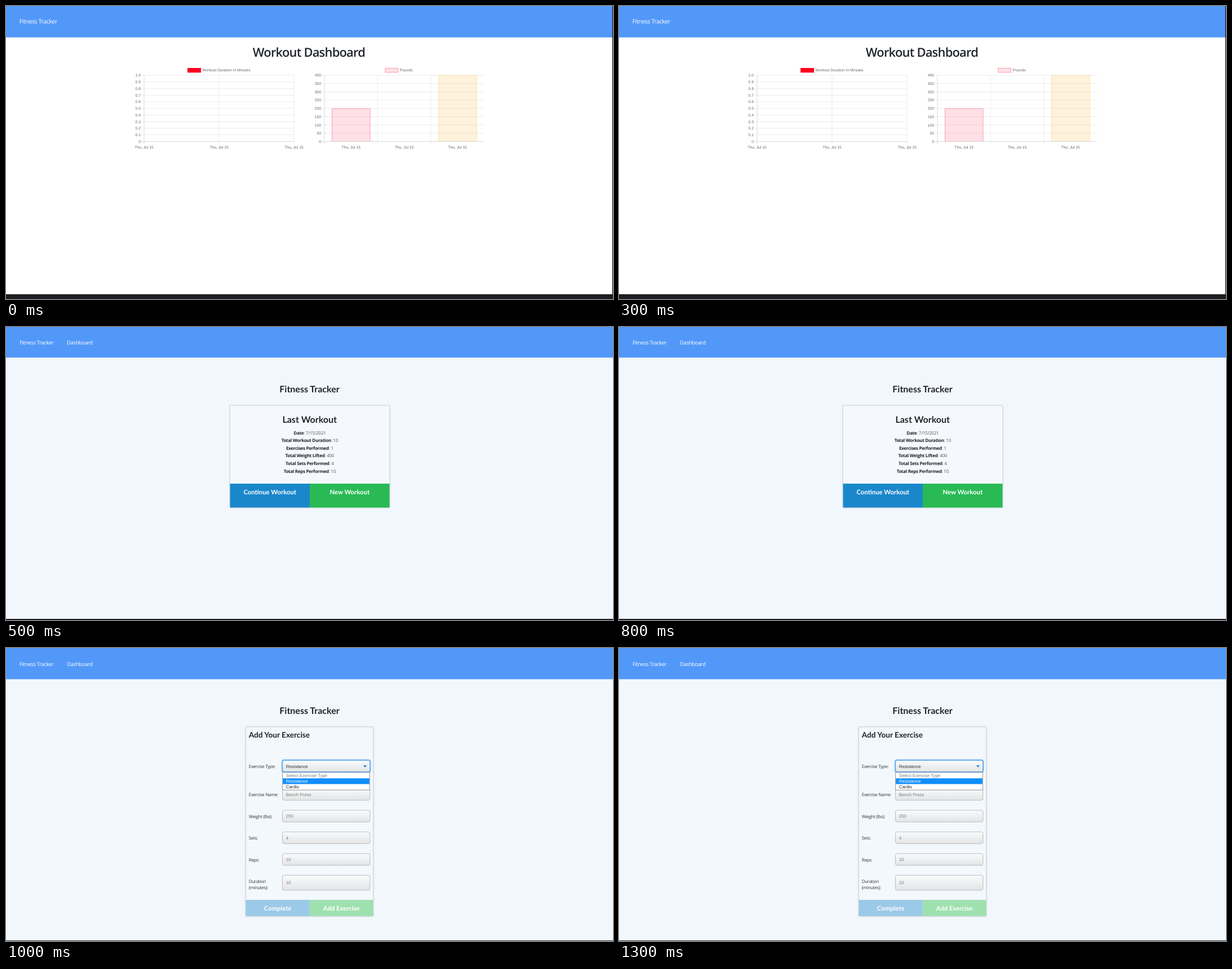
Recreate the animation shown at these times as an HTML page. Size 1077x520 px, loop 1.5 s.

```html
<!DOCTYPE html>
<html lang="en">
<head>
<meta charset="utf-8">
<title>Fitness Tracker</title>
<style>
  html, body { margin: 0; width: 100%; height: 100%; overflow: hidden; background: #fff; }
  svg { display: block; width: 1077px; height: 520px; text-rendering: geometricPrecision; }
  .page { animation: show 1.5s step-end infinite; }
  #home { animation-delay: -1s; }
  #exercise { animation-delay: -.5s; }
  @keyframes show {
    0% { visibility: visible; }
    33.3333%, 100% { visibility: hidden; }
  }
  .ui { font-family: "Open Sans", "Noto Sans", sans-serif; letter-spacing: -.035em; }
  .lato { font-family: Lato, sans-serif; font-weight: 700; }
  .arial { font-family: "Liberation Sans", Arial, sans-serif; }
  .mid { text-anchor: middle; }
  .end { text-anchor: end; }
  .card { filter: drop-shadow(0 .6px 1.2px rgba(60, 70, 80, .35)); }
</style>
</head>
<body>
<svg viewBox="0 0 1077 520">
  <defs>
    <linearGradient id="field" x2="0" y2="1">
      <stop stop-color="#fafbfc"/>
      <stop offset="1" stop-color="#e3e4e5"/>
    </linearGradient>
  </defs>
  <g id="dashboard" class="page"></g>
  <g id="home" class="page"></g>
  <g id="exercise" class="page"></g>
</svg>
<script>
const NAV = '#5298f9', INK = '#212529', BLUE = '#1b87cb', GREEN = '#29ba55';

const rect = (x, y, w, h, fill, extra = '') =>
  `<rect x="${x}" y="${y}" width="${w}" height="${h}" fill="${fill}" ${extra}/>`;
const text = (x, y, size, cls, fill, body, extra = '') =>
  `<text x="${x}" y="${y}" font-size="${size}" class="${cls}" fill="${fill}" ${extra}>${body}</text>`;
const path = (d, stroke, width = 1) =>
  `<path d="${d}" fill="none" stroke="${stroke}" stroke-width="${width}"/>`;
const show = (id, ...parts) => document.getElementById(id).innerHTML = parts.flat().join('');

const label = (x, y, body, cls = '') => text(x, y, 6.75, 'arial ' + cls, '#666', body);
const title = y => text(538.5, y, 16, 'lato mid', INK, 'Fitness Tracker');
const nav = (height, baseline) => [
  rect(0, 0, 1077, height, NAV),
  text(24, baseline, 9.45, 'ui', '#fff', 'Fitness Tracker'),
  text(108, baseline, 9.45, 'ui', '#fff', 'Dashboard')
];
const button = (x, y, w, h, fill, baseline, body) =>
  rect(x, y, w, h, fill) + text(x + w / 2, baseline, 11.3, 'lato mid', '#fff', body);

// Grid lines and value labels, from the top value down to zero
function grid(left, right, values, columns) {
  const top = 123, bottom = 240.5, step = (bottom - top) / (values.length - 1);
  const rows = values.map((value, i) => {
    const y = top + i * step, zero = i === values.length - 1;
    return path(`M${left - 5} ${y}H${right}`, zero ? '#cfcfcf' : '#e6e6e6', .8) +
      label(left - 6, y + 2.4, value, 'end');
  });
  const lines = columns.map((x, i) => path(`M${x} ${top}V245`, i ? '#e6e6e6' : '#d2d2d2', .8));
  return [...rows, ...lines];
}
const dates = centers => centers.map(x => label(x, 252.6, 'Thu, Jul 15', 'mid'));
const bar = (x, y, w, fill, stroke) =>
  rect(x, y, w, 240.5 - y, fill) + path(`M${x} 240.5V${y}H${x + w}V240.5`, stroke);

const tenths = Array.from({ length: 11 }, (_, i) => i === 10 ? '0' : (1 - i / 10).toFixed(1));
const pounds = Array.from({ length: 9 }, (_, i) => 400 - i * 50);

show('dashboard',
  rect(0, 0, 1077, 520, '#fff'),
  rect(0, 0, 1077, 55.7, NAV),
  text(23.7, 30.8, 10.5, 'ui', '#fff', 'Fitness Tracker'),
  text(537.5, 89.6, 21.9, 'ui mid', INK, 'Workout Dashboard', 'font-weight="600"'),
  grid(245, 511, tenths, [245, 378, 511]),
  dates([245, 378, 511]),
  rect(322, 110, 24, 8.2, '#ff0020'),
  label(348.3, 116.3, 'Workout Duration In Minutes'),
  grid(565, 848, pounds, [565, 659.3, 753.8]),
  dates([612.3, 706.6, 801]),
  bar(578.5, 182, 67.5, 'rgba(255,99,132,.2)', '#fb9cb0'),
  bar(767.5, 123.3, 67.8, 'rgba(255,180,60,.18)', '#fce3ae'),
  rect(672.8, 110.4, 22.6, 7.4, '#ffe0e6', 'stroke="#fb9cb0"'),
  label(698.8, 116.3, 'Pounds'),
  rect(0, 511.5, 1077, 8.5, '#1c1d22'),
  rect(1075.7, 0, 1.3, 520, '#26272c')
);

const summary = [
  ['Date', '7/15/2021'],
  ['Total Workout Duration', 10],
  ['Exercises Performed', 1],
  ['Total Weight Lifted', 400],
  ['Total Sets Performed', 4],
  ['Total Reps Performed', 10]
];

show('home',
  rect(0, 0, 1077, 520, '#f2f7fe'),
  nav(54.3, 30.6),
  title(116),
  rect(397.5, 139.5, 283, 181, '#f5f9fd', 'rx="1.5" class="card" stroke="#d6dadf" stroke-width=".7"'),
  text(538.7, 169.8, 16, 'lato mid', INK, 'Last Workout'),
  summary.map(([name, value], i) => text(538.8, 190.6 + i * 13.6, 8, 'ui mid', '#555',
    `<tspan font-weight="700" fill="${INK}">${name}</tspan>: ${value}`)),
  button(397.5, 278, 141.5, 42.4, BLUE, 297, 'Continue Workout'),
  button(539, 278, 141.5, 42.4, GREEN, 297, 'New Workout'),
  rect(0, 518, 1077, 2, '#1c1d22')
);

const caption = (y, body) => text(430.8, y, 7.9, 'ui', '#333', body);
const value = (y, body, fill = '#7b7b7b') => text(496.7, y, 7.9, 'arial', fill, body);
const field = (y, h, body) =>
  rect(490.5, y, 155.3, h, 'url(#field)', 'rx="3" stroke="#b4b7ba" stroke-width=".9"') +
  value(y + h / 2 + 2.7, body);

show('exercise',
  rect(0, 0, 1077, 520, '#f2f7fc'),
  nav(55.4, 31.6),
  title(117),
  rect(425.5, 140.2, 226, 335.6, '#f3f8fd', 'rx="1.5" class="card" stroke="#d0d5da" stroke-width=".7"'),
  text(430.8, 159.4, 13.6, 'lato', INK, 'Add Your Exercise'),
  caption(213.4, 'Exercise Type:'),
  caption(263.2, 'Exercise Name:'),
  caption(301.7, 'Weight (lbs):'),
  caption(340.1, 'Sets:'),
  caption(378.5, 'Reps:'),
  caption(417, 'Duration'),
  caption(428, '(minutes):'),
  field(249.4, 20.8, 'Bench Press'),
  field(288, 20.8, '200'),
  field(326.4, 20.8, '4'),
  field(364.9, 20.8, '10'),
  field(403.3, 26.6, '10'),
  rect(490.3, 199.2, 155.8, 20.8, 'url(#field)',
    'rx="3" stroke="#5eaaf0" stroke-width="1.8" style="filter:drop-shadow(0 0 1px #8cc4f5)"'),
  value(212.8, 'Resistance', '#333'),
  `<path d="M633.8 208.2h6.4l-3.2 3.8z" fill="${BLUE}"/>`,
  rect(490.7, 220.8, 154.6, 31.2, '#fff', 'stroke="#85888b" stroke-width=".9"'),
  value(228.8, 'Select Exercise Type'),
  rect(491.2, 231.3, 153.6, 10.2, '#0f8efc'),
  value(238.9, 'Resistance', '#fff'),
  value(249, 'Cardio', '#222'),
  button(425.5, 447, 113.3, 28.8, '#9bc9e8', 465.8, 'Complete'),
  button(538.8, 447, 112.7, 28.8, '#9ee1af', 465.8, 'Add Exercise'),
  rect(0, 518.8, 1077, 1.2, '#4a4c52')
);
</script>
</body>
</html>
```
